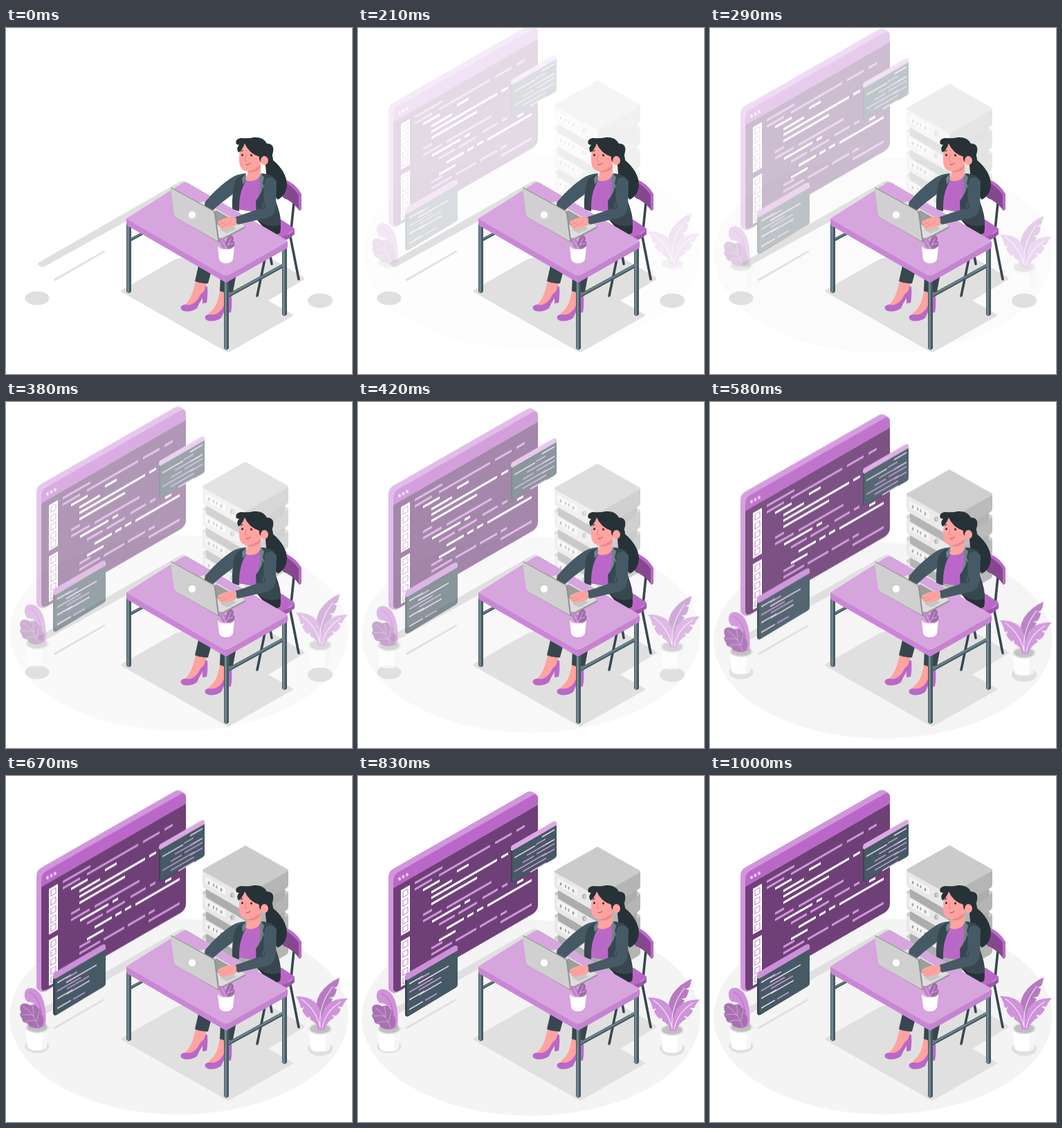
Recreate the animation shown at these times as an HTML page without scripts. Size 500 px wide and 500 px high, loop 1.04 s.

```html
<!DOCTYPE html>
<html lang="en">
<head>
<meta charset="utf-8">
<title>Programmer at a desk</title>
<style>
html, body { margin: 0; width: 100%; height: 100%; overflow: hidden; background: #fff; }
svg { display: block; width: 100%; height: 100%; }
.scene { animation: drop 1040ms infinite; }
@keyframes drop {
  0% { opacity: 0; transform: translateY(-30px); animation-timing-function: cubic-bezier(.352, .045, .499, 1.372); }
  94%, 100% { opacity: 1; transform: none; }
}
.code path { fill: none; stroke-width: 3.5; }
.code.small path { stroke-width: 1.8; }
.w { stroke: #fff; }
.p { stroke: #cf95da; }
.pale { stroke: #ead0ee; }
.line { fill: none; stroke-linecap: round; stroke-linejoin: round; }
.dark { fill: #37474f; }
.slate { fill: #455a64; }
.skin { fill: #ffa3a0; }
.plum { fill: #ba68c8; }
.lilac { fill: #cf93da; }
.hair { fill: #263238; }
.shade { fill: #e0e0e0; }
</style>
</head>
<body>
<svg viewBox="0 0 500 500">
<defs>
  <g id="server">
    <path fill="#e8e8e8" d="M284 137Q284 135 287 137L346 171V196L287 162Q284 160 284 157Z"/>
    <path fill="#b5b5b5" d="M346 171L406 137Q408 135 408 138V157Q408 160 405 162L346 196Z"/>
    <path fill="#cbcbcb" d="M346 100L407 134.500Q409 136 407 137.500L346 172L285 137.500Q283 136 285 134.500Z"/>
    <path fill="#f5f5f5" d="M288 145L317 161.500V172L288 155.500Z"/>
    <g fill="#a6a6a6">
      <ellipse cx="293" cy="154" rx="1.500" ry="2.600"/>
      <ellipse cx="300" cy="157.500" rx="1.100" ry="2.400"/>
      <ellipse cx="304.500" cy="160" rx="1.100" ry="2.400"/>
      <ellipse cx="311" cy="164" rx="1.500" ry="2.600"/>
      <ellipse cx="327" cy="172" rx="2.800" ry="3.500"/>
    </g>
    <ellipse cx="327.500" cy="172" rx="1.800" ry="2.500" fill="#cfcfcf"/>
  </g>
  <path id="gap" fill="#adadad" d="M289 161L346 194L403 161V175L346 209L289 175Z"/>
  <g id="pot">
    <path fill="#f6f6f6" d="M-17 0L-14 27Q-13 33 0 33T14 27L17 0Z"/>
    <path fill="#fff" d="M-17 0L-14 27Q-13 33 0 33Q4 33 7 32L8 0Z"/>
    <ellipse rx="17" ry="8.500" fill="#e4e4e4"/>
    <ellipse rx="14.500" ry="6.800" fill="#c0c0c0"/>
  </g>
  <g id="tabs">
    <path fill="#fff" d="M62 163H75V229H62Z"/>
    <path fill="#fff" stroke="#b98ac1" stroke-width="1.100" d="M65 167h7v8h-7zM65 180h7v8h-7zM65 193h7v8h-7zM65 206h7v8h-7zM65 218h7v8h-7z"/>
  </g>
</defs>

<!-- floor -->
<g class="scene"><ellipse cx="250" cy="347.500" rx="244.500" ry="141.500" fill="#f4f4f4"/></g>
<g class="shade">
  <path d="M168 378Q165 380 168 382L317 467Q321 470 325 467L413 417Q417 415 413 413L379 394L430 364Q433 362 430 360L340 308L245 334Z"/>
  <path d="M47 339L251 222Q256 219 260 222L268 227L55 345Q52 346 49 344Q44 342 47 339Z"/>
  <path d="M69 363L141 322L144 323L72 365Q69 366 69 363Z"/>
  <ellipse cx="45" cy="390.500" rx="17.500" ry="10"/>
  <ellipse cx="454" cy="394" rx="18" ry="10.500"/>
</g>

<g class="scene">
  <!-- servers -->
  <use href="#server" y="96"/>
  <use href="#gap" y="64"/><use href="#server" y="64"/>
  <use href="#gap" y="32"/><use href="#server" y="32"/>
  <use href="#gap"/><use href="#server"/>

  <!-- main window -->
  <path fill="#d196dc" d="M44 304V144Q44 136 51 132L244 21.500Q249 19 253 21.500L257 24Q260 27 260 32V184Q260 192 253 197L60 309Q54 313 50 311Q44 309 44 304Z"/>
  <path fill="#6f4078" d="M51 160L260 39.500V184Q260 192 253 197L60 308Q51 313 51 304Z"/>
  <path class="plum" d="M51 160V150Q51 141 58 137L252 26Q260 22 260 31V39.500Z"/>
  <g fill="#ead0ee">
    <ellipse cx="60" cy="146.500" rx="2" ry="2.500"/>
    <ellipse cx="65.500" cy="143.500" rx="2" ry="2.500"/>
    <ellipse cx="71" cy="140.500" rx="2" ry="2.500"/>
  </g>
  <g transform="matrix(1 -.577 0 1 0 35.800)">
    <use href="#tabs"/>
    <use href="#tabs" y="74"/>
  </g>
  <g class="code" transform="matrix(1 -.577 0 1 0 47.300)">
    <path class="p" d="M82 153h40M82 162h25M117 162h74M198 162h24M229 162h12M94 206h13M94 215h27M128 215h65M117 233h23M145 233h27M180 231h22M208 231h8M106 261h16M106 270h30M141 270h30M176 270h25M206 270h9M206 281h45"/>
    <path class="w" d="M94 170h24M143 171h17M106 180h30M106 188h95M207 188h10M106 197h66M107 223h41M154 223h8M230 238h9M128 245h25M158 245h9M172 245h9M187 246h64M117 256h24"/>
  </g>

  <!-- right floating window -->
  <path class="dark" d="M221 104L284 68L287 70V112Q287 115 284 117L225 151Q221 154 221 150Z"/>
  <path class="slate" d="M223 106L287 69V112Q287 115 284 117L226 150Q223 152 223 149Z"/>
  <path fill="#dba9e4" d="M221 105V102Q221 99 224 97.500L282 64Q287 62 287 66V69L223 106Z"/>
  <g class="code small" transform="matrix(1 -.577 0 1 0 127.500)">
    <path class="pale" d="M266 112h18M226 119h30M266 126h18M249 153h23"/>
    <path class="p" d="M257 118h14M244 126h27M258 132h26M238 133h16M226 139h46M238 146h34M266 140h18"/>
  </g>

  <!-- left floating window -->
  <path class="dark" d="M68 290L141 247L144 249V299Q144 302 141 304L73 345Q68 347 68 342Z"/>
  <path class="slate" d="M71 293L144 250V299Q144 302 141 304L74 343Q71 345 71 341Z"/>
  <path fill="#cd8fd9" d="M68 292V288Q68 285 71 283L138 244Q144 241 144 246V250L71 293Z"/>
  <g class="code small" transform="matrix(1 -.577 0 1 0 39.200)">
    <path class="pale" d="M74 302h20M87 309h44M74 325h22M88 326h33M74 339h20"/>
    <path class="p" d="M87 303h16M74 314h34M88 319h32M97 339h17"/>
  </g>

  <!-- left plant -->
  <use href="#pot" x="45" y="363"/>
  <path class="lilac" d="M27 318Q26 306 36 306Q49 307 55 327Q59 345 57 360Q52 366 45 362Q51 345 44 332Q40 326 31 326Q28 323 27 318Z"/>
  <path class="line" stroke="#ad6bba" stroke-width="1" d="M34 312Q53 321 52 360"/>
  <path fill="#a871b2" d="M43 364Q32 363 31 357Q23 356 23 350Q18 344 22 341Q18 333 23 329Q30 327 35 331Q43 327 46 335Q52 337 50 344Q56 348 54 354Q55 362 47 364Z"/>
  <path class="line" stroke="#d9b2df" stroke-width=".8" d="M25 333Q40 341 47 362M23 345Q33 343 40 346M28 355Q38 351 44 354M38 331Q40 337 40 345M48 339Q46 345 45 353"/>

  <!-- right plant -->
  <use href="#pot" x="454" y="365"/>
  <path fill="#b67bc1" d="M451 366Q443 332 454 314Q464 299 482 291Q481 300 478 304L473 306L478 307Q477 315 473 319L467 320L472 322Q468 331 464 334L460 335L463 338Q456 350 457 366Z"/>
  <path class="lilac" d="M452 366Q449 356 440 352L439 347L436 349Q430 344 428 338L431 334L426 335Q424 325 419 318Q436 318 445 325Q456 333 458 366Z"/>
  <path class="lilac" d="M454 366Q454 343 464 331Q474 320 494 321Q488 327 486 333L479 333L484 337Q481 343 477 346L471 345L474 349Q463 355 460 366Q457 368 454 366Z"/>
  <path class="line" stroke="#f6e8f8" stroke-width="1.100" d="M454 363Q451 331 472 304M454 363Q448 337 427 322M457 364Q461 340 484 326"/>
</g>

<!-- chair -->
<g class="line" stroke="#37474f" stroke-width="3.600">
  <path d="M416 252L412 292M411 302L423 363M374 334L363 387M380 318L384 341"/>
</g>
<path fill="#85488f" d="M400 220Q414 223 424 236L427 240V262L424 264Q414 250 400 245Z"/>
<path class="plum" d="M403 219Q418 224 427 240V262L423 264V241Q413 227 400 222Z"/>
<path class="plum" d="M378 285L398 277L416 289Q418 291 416 292L400 303H385Z"/>
<path fill="#a057ad" d="M417 291V298Q408 306 398 309L380 302L398 302Q411 298 417 291Z"/>

<!-- legs -->
<path class="skin" d="M275 361L291 364Q287 378 285 390L275 403Q262 406 258 400Q269 393 275 361Z"/>
<path class="skin" d="M309 374L326 376Q320 396 321 402L310 417Q297 418 293 412Q308 402 309 374Z"/>
<path id="shoe" class="plum" d="M291 374Q292 387 290 397L284 398V389Q279 398 276 405Q267 411 257 409Q251 407 253 402Q257 399 261 400Q273 402 281 385Q287 382 288 373Z"/>
<use href="#shoe" x="35" y="14"/>
<path class="dark" d="M280 335H301L292 369Q283 370 273 366Z"/>
<path class="dark" d="M310 355H333L328 381Q318 384 309 380Z"/>

<!-- body -->
<path class="hair" d="M373 175Q386 180 386 191Q405 207 406 226Q405 242 393 248Q379 235 376 210Z"/>
<path class="hair" d="M361 275L393 270Q399 283 396 296Q389 302 376 293Z"/>
<path class="plum" d="M341 219Q353 211 368 214L372 268L335 262Z"/>
<path class="slate" d="M346 210Q332 211 322 219Q302 234 288 251Q285 259 297 265Q312 251 329 239L327 262L336 264Q336 237 347 218Z"/>
<path class="dark" d="M347 211Q336 213 331 222Q326 240 327 262L337 265Q336 237 347 220Z"/>
<path class="dark" d="M369 210Q387 211 391 222L389 248Q398 271 397 284Q378 291 362 276L361 250Q373 232 369 210Z"/>
<path fill="#6f838b" d="M347 210L341 217L342 226L347 220ZM368 210L373 216L371 224L373 230L363 248Q370 230 366 214Z"/>
<path class="skin" d="M350 197L368 190L368 212Q364 221 354 221Q348 222 346 218Q351 211 350 197Z"/>
<path fill="#eb8a8a" d="M350 206Q360 205 368 198L367 203Q361 209 351 209Z"/>
<path class="skin" d="M341 169Q336 179 337 194Q338 206 348 207Q360 207 368 196L374 178L361 166Z"/>
<path class="hair" d="M333 168Q330 161 339 159Q352 160 358 158Q372 157 377 167Q388 167 386 179Q385 186 381 192L370 195Q365 192 366 186Q351 181 345 167Q341 177 336 180Q332 173 337 169Z"/>
<ellipse class="skin" cx="373.500" cy="191.500" rx="5.500" ry="6.500"/>
<g class="hair"><ellipse cx="341.500" cy="183.500" rx="1.400" ry="1.800"/><ellipse cx="354.500" cy="184" rx="1.400" ry="1.800"/></g>
<path class="line" stroke="#263238" stroke-width="1.200" d="M339 178L342 177M353 177Q356 176 359 179"/>
<path class="line" stroke="#e37f80" stroke-width="1" d="M347 184L345 191L348 192"/>
<path class="line" stroke="#b75468" stroke-width="1.100" d="M347 197Q350 199 353 195"/>

<!-- desk -->
<g class="slate">
  <path d="M181 303L203 291.500V296L181 308ZM321 384L401 340V346L321 390Z"/>
  <path d="M174 280H181V381Q177.500 385 174 381ZM399 312H406V414Q402.500 418 399 414ZM315 360H322V463Q318.500 467 315 463Z"/>
</g>
<path fill="#73868d" d="M175 280H178V382H175ZM400 312H403V415H400ZM316 360H319V464H316ZM322 384.500L400 341.500V344L322 387ZM181 304L203 292.500V294L181 305.500Z"/>
<path fill="#cb85d7" d="M174 275L318 358V368L176 286Q174 285 174 282Z"/>
<path fill="#c583d1" d="M318 358L407 308V316Q407 318 405 319L318 368Z"/>
<path fill="#d6a5de" d="M176 274L255 224Q259 222 263 224L405 306Q408 308 405 310L322 357Q318 359 314 357L176 277Q173 276 176 274Z"/>

<!-- laptop -->
<path fill="#dedede" d="M244 272L285 250L344 285Q347 287 344 289L306 307Z"/>
<path fill="#9d9d9d" d="M306 307L346 286V289L306 310ZM303 263L326 276L309 286L297 278Z"/>
<path fill="#c6c6c6" d="M323 284L333 290L319 297L309 291Z"/>

<!-- arms and hands -->
<path class="slate" d="M318 222Q301 236 288 251L286 261L297 265Q312 251 329 239Z"/>
<path class="slate" d="M374 220Q384 211 391 222L390 258Q389 270 378 274L335 284Q330 280 332 273L370 260Z"/>
<path class="line" stroke="#2f4049" stroke-width="1" d="M371 230Q369 248 375 258L369 262"/>
<path class="skin" d="M333 275Q323 272 316 275L307 279Q304 283 309 284L308 288Q312 291 319 289Q328 288 333 284Z"/>
<path class="line" stroke="#e98688" stroke-width=".8" d="M309 284L316 281M311 288L319 284"/>

<path fill="#8d8d8d" d="M300 264L303 267L308 307L306 309L244 273Z"/>
<path fill="#d0d0d0" d="M238 232Q238 230 240 231L298 263Q301 265 301 268L306 306Q306 309 304 307L246 274Q244 273 243 270Z"/>
<path class="line" stroke="#959595" stroke-width="1.300" d="M239 231L299 264Q301 265 302 269L307 307"/>
<circle cx="269" cy="270" r="5.200" fill="#fff"/>

<!-- desk plant -->
<path fill="#b987c3" d="M314 319Q306 309 308 303Q315 304 319 310L323 321Z"/>
<path fill="#a26aac" d="M318 320Q316 302 326 299Q331 304 328 308Q332 309 330 313Q331 319 323 321Z"/>
<path class="line" stroke="#dfb9e5" stroke-width=".9" d="M312 307L318 319L325 304M321 313L328 311"/>
<path fill="#fff" d="M306 316L308 334Q310 340 318 340T328 334L330 316Q329 320 318 320T306 316Z"/>
<path class="line" stroke="#ebe3ed" stroke-width="1.300" d="M306.500 316Q309 320 318 320T329.500 316"/>
</svg>
</body>
</html>
```
